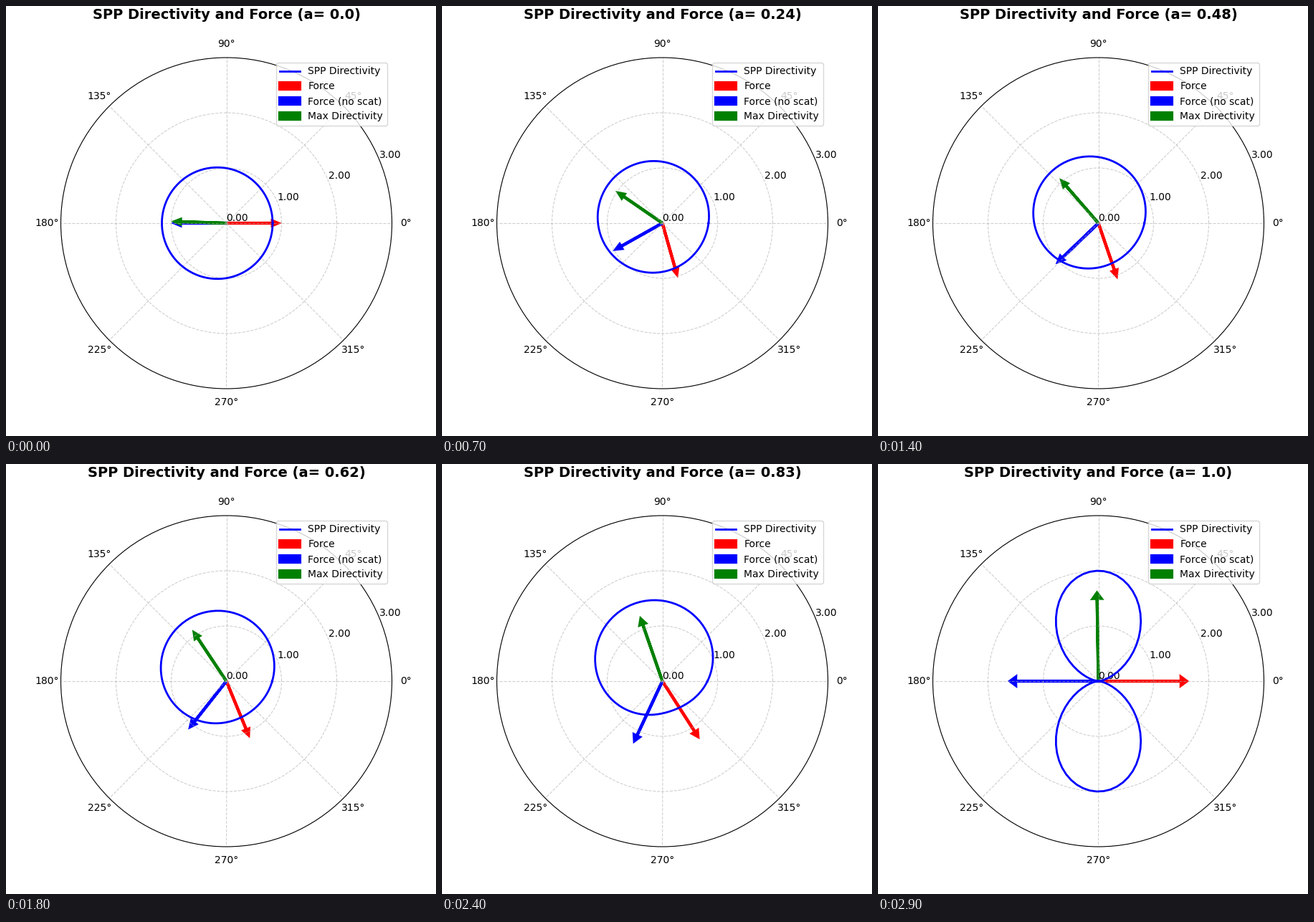
These frames come from a looping animation (600 px wide and 600 px high, 3 s). A matplotlib script:

```python
import numpy as np
import matplotlib.pyplot as plt
from matplotlib.animation import FuncAnimation

FRAMES = 30
INTERVAL = 100

# Coupling of the in-plane dipole parts relative to the vertical one
SIDE = 0.1026
FORWARD = -0.083

theta = np.linspace(0, 2 * np.pi, 100)


def directivity(a):
    """Angular pattern of the surface wave, with a mean of one."""
    up = np.sqrt(1 - a)
    across = SIDE * np.sqrt(a)
    along = FORWARD * up
    field = up + across * np.sin(theta) + along * np.cos(theta)
    return field**2 / (up**2 + (across**2 + along**2) / 2)


def force_angles(a):
    """Directions of the total force and of the force without scattering."""
    lateral = -np.sqrt(a * (1 - a))
    total = np.arctan2(lateral, 0.071 + 0.207 * a)
    no_scat = np.arctan2(lateral, a - 1.004)
    return total, no_scat


fig = plt.figure(figsize=(6, 6), dpi=100)
ax = fig.add_subplot(projection="polar")

curve, = ax.plot(theta, directivity(0), color="blue", lw=2,
                 label="SPP Directivity")


def make_arrow(color, label):
    return ax.arrow(0, 0, 0, 1, color=color, lw=3, head_width=0.1,
                    head_length=0.1, length_includes_head=True, label=label)


arrows = [
    make_arrow("red", "Force"),
    make_arrow("blue", "Force (no scat)"),
    make_arrow("green", "Max Directivity"),
]

ax.set_ylim(0, 3)
ax.set_yticks([0, 1, 2, 3])
ax.yaxis.set_major_formatter("{x:.2f}")
ax.grid(True, linestyle="--", alpha=0.6)
ax.legend(loc="upper right")


def update(i):
    a = i / (FRAMES - 1)
    r = directivity(a)
    curve.set_data(theta, r)

    # Rounding makes the first of two equal peaks win
    peak = theta[np.argmax(np.round(r, 9))]
    length = 0.8 * r.max()
    for arrow, angle in zip(arrows, (*force_angles(a), peak)):
        arrow.set_data(x=angle, y=0, dx=0, dy=length)

    ax.set_title(f"SPP Directivity and Force (a= {round(a, 2)})",
                 fontsize=14, fontweight="bold", pad=20)
    return [curve, *arrows]


anim = FuncAnimation(fig, update, frames=FRAMES, interval=INTERVAL,
                     repeat=True, repeat_delay=0, blit=False)
plt.show()
```
